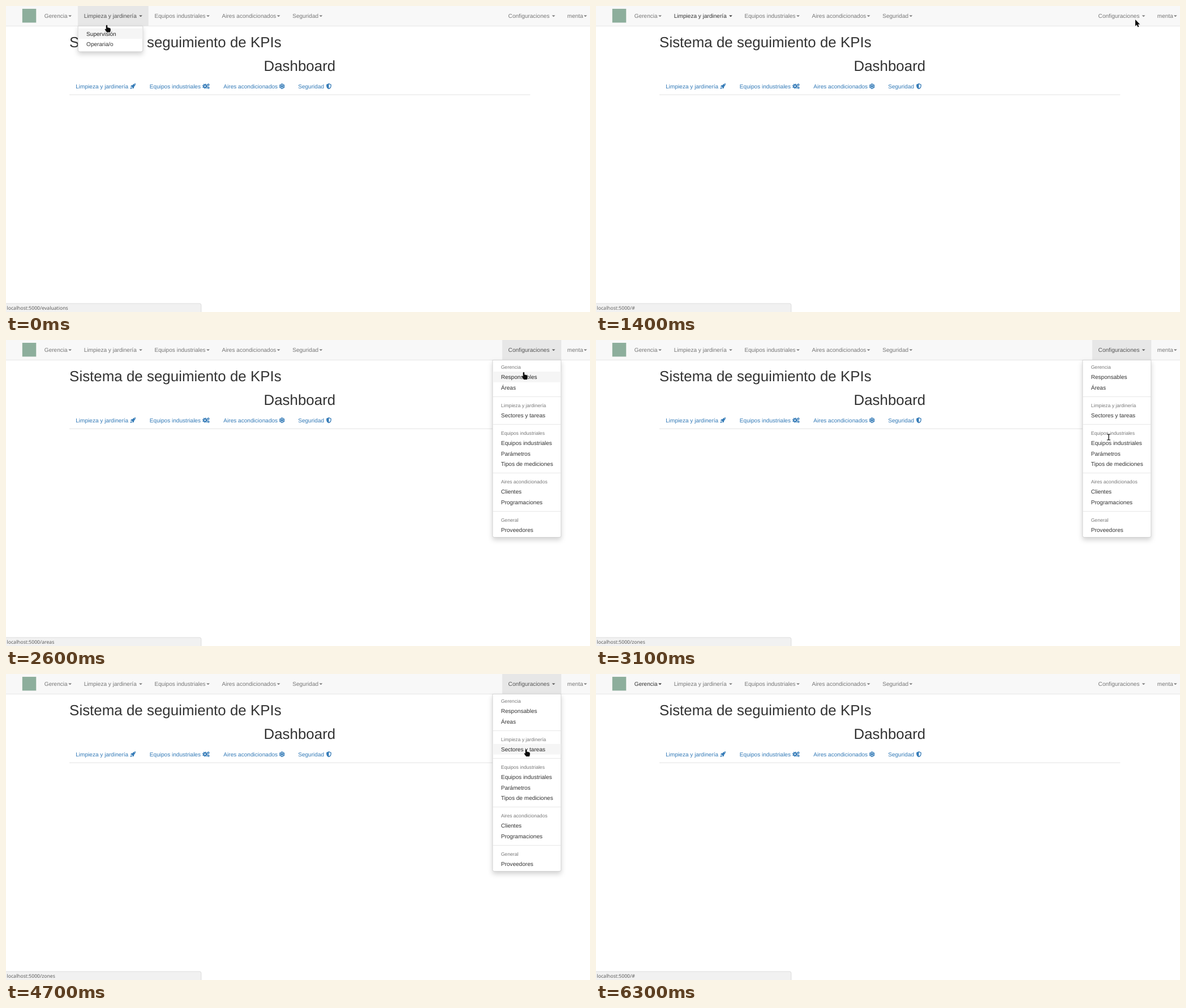
Animation, 1032 px wide and 542 px high, one loop 6700 ms. Source, as an HTML page:

```html
<!DOCTYPE html>
<html lang="es">
<head>
<meta charset="utf-8">
<title>Dashboard</title>
<style>
  html, body { margin: 0; height: 100%; overflow: hidden; background: #fff; }
  svg { display: block; width: 100vw; height: 100vh; }
  text { font: 14px "Liberation Sans", Arial, sans-serif; text-rendering: geometricPrecision; white-space: pre; }
  .nav { color: #777; fill: currentColor; }
  .nav rect { fill: none; }
  .nav.lit { color: #333; }
  .nav.open { color: #555; }
  .nav.open rect { fill: #e7e7e7; }
  .title { font-size: 36px; fill: #333; }
  .tab { fill: #337ab7; color: #337ab7; }
  .menu { filter: drop-shadow(0 6px 6px rgba(0,0,0,.175)); }
  .menu .box { fill: #fff; stroke: #c6c6c6; }
  .row text { fill: #333; }
  .row rect { fill: none; }
  .row.hover rect { fill: #f5f5f5; }
  .row.hover text { fill: #262626; }
  .head { font-size: 12px; fill: #777; }
  #url { font: 12px "Noto Sans", "Open Sans", sans-serif; fill: #5c5c5c; }
  .cursor { fill: #0c0c0c; stroke: #fff; stroke-width: .9; stroke-linejoin: round; paint-order: stroke;
            filter: drop-shadow(.5px .8px .6px rgba(0,0,0,.3)); }
</style>
</head>
<body>
<svg viewBox="0 0 1032 542" preserveAspectRatio="none">
  <g id="page" transform="matrix(.72 0 0 .72 0 -.8)">
    <rect y="-2" width="1434" height="52" fill="#f8f8f8"/>
    <rect y="50" width="1434" height="1" fill="#e0e0e0"/>
    <rect x="40" y="8" width="34" height="34" fill="#8dae9c"/>
    <g id="bar"></g>
    <text class="title" x="155.7" y="102.3">Sistema de seguimiento de KPIs</text>
    <text class="title" x="720.6" y="161" text-anchor="middle">Dashboard</text>
    <rect x="155.5" y="218.8" width="1131" height="1.2" fill="#dcdcdc"/>
    <g id="tabs" class="tab">
      <g transform="translate(304.6 191.5)">
        <path fill-rule="evenodd" d="M13.8.3C10.6.2 8 1.8 5.9 4.4L3 4.6.6 7.9 3.6 7.8 6 10.3 6.1 13.4 9.5 11 9.6 8.1C12.2 6 13.9 3.4 13.8.3ZM11.2 2a.8.8 0 1 1-.01 0Z"/>
        <path d="M2.8 9.4C1.4 10 .8 11.4.5 13.5 2.5 13.3 4 12.6 4.6 11.2Z"/>
      </g>
      <g id="cogs" transform="translate(482.4 191.5)" fill="none" stroke="currentColor"></g>
      <g id="flake" transform="translate(677.4 198.5)" fill="none" stroke="currentColor" stroke-width="1.6" stroke-linecap="round"></g>
      <path transform="translate(785.4 191.5)" fill-rule="evenodd" d="M7 0 13 2.5V6C13 10 10.5 12.8 7 14 3.5 12.8 1 10 1 6V2.5ZM7 2V12C9.6 10.9 11.2 8.8 11.2 6V3.7Z"/>
    </g>
    <g id="menus"></g>
    <g id="status">
      <path id="bubble" d="M-1 756V733H475Q479 733 479 737V756Z" fill="#f1f1f1" stroke="#d2d2d2"/>
      <text id="url" x="2" y="748.6"></text>
    </g>
  </g>
  <g id="hand" class="cursor">
    <path d="M-1.2.9Q-1.2-.3 0-.3T1.2.9V4L5.2 4.9Q6.8 5.4 6.8 7V9.4L5.8 12.6H.2L-3 8.2Q-3.6 7-2.6 6.7T-1.2 7.4Z"/>
  </g>
  <g id="arrow" class="cursor">
    <path d="M0 0V11.6L2.7 9.2 4.5 13.2 6.4 12.4 4.7 8.5H8.2Z"/>
  </g>
  <g id="beam" class="cursor">
    <path d="M-3-5.6H-.8L0-5 .8-5.6H3V-4.4H1.1L.6-4V4L1.1 4.4H3V5.6H.8L0 5-.8 5.6H-3V4.4H-1.1L-.6 4V-4L-1.1-4.4H-3Z"/>
  </g>
</svg>
<script>
const $ = id => document.getElementById(id);

function add(parent, tag, attrs, text) {
  const el = document.createElementNS("http://www.w3.org/2000/svg", tag);
  for (const k in attrs) el.setAttribute(k, attrs[k]);
  if (text) el.textContent = text;
  return parent.appendChild(el);
}

// Navigation bar: label start and caret start
function navItem(label, x, caret) {
  const g = add($("bar"), "g", { class: "nav" });
  add(g, "rect", { x: x - 15, y: -2, width: caret + 38 - x, height: 52 });
  add(g, "text", { x, y: 29.9 }, label);
  add(g, "path", { d: `M${caret} 24h8l-4 4z` });
  return g;
}
const gerencia = navItem("Gerencia", 94.2, 153.1);
const limpieza = navItem("Limpieza y jardinería", 191.3, 326.6);
navItem("Equipos industriales", 364.5, 491.9);
navItem("Aires acondicionados", 529.9, 664.9);
navItem("Seguridad", 703, 768.8);
const config = navItem("Configuraciones", 1232.8, 1339.9);
navItem("menta", 1377.6, 1418);

[["Limpieza y jardinería", 171.1], ["Equipos industriales", 352.5],
 ["Aires acondicionados", 533.8], ["Seguridad", 716.9]]
  .forEach(([label, x]) => add($("tabs"), "text", { x, y: 203.8 }, label));

// Tab icons
function gear(cx, cy, r, w) {
  add($("cogs"), "circle", { cx, cy, r, "stroke-width": w });
  const rim = r + w * .75, tooth = 2 * Math.PI * rim / 16;
  add($("cogs"), "circle", { cx, cy, r: rim, "stroke-width": w * .6, "stroke-dasharray": tooth });
}
gear(6, 7, 3.3, 3);
gear(14.2, 3.3, 1.7, 1.6);
gear(14.2, 10.7, 1.7, 1.6);
for (let a = 0; a < 360; a += 60)
  add($("flake"), "path", { d: "M0 0V-6.2M-2-5.6 0-3.8 2-5.6", transform: `rotate(${a})` });

// Dropdowns: "#" marks a header, "-" a divider
function menu(x, width, lines) {
  const g = add($("menus"), "g", { class: "menu" });
  const box = add(g, "path", { class: "box" });
  const rows = {};
  let y = 56;
  for (const line of lines) {
    if (line === "-") {
      add(g, "rect", { x: x + 1, y: y + 9, width: width - 2, height: 1, fill: "#dedede" });
      y += 19;
    } else if (line[0] === "#") {
      add(g, "text", { class: "head", x: x + 21, y: y + 15.8 }, line.slice(1));
      y += 23;
    } else {
      const row = rows[line] = add(g, "g", { class: "row" });
      add(row, "rect", { x: x + 1, y, width: width - 2, height: 26 });
      add(row, "text", { x: x + 21, y: y + 18.2 }, line);
      y += 26;
    }
  }
  box.setAttribute("d", `M${x + .5} 50.5h${width - 1}V${y + 1.5}q0 4-4 4h${9 - width}q-4 0-4-4z`);
  return { g, rows };
}
const cleaning = menu(176.3, 160, ["Supervisión", "Operaria/o"]);
const settings = menu(1193.8, 169, [
  "#Gerencia", "Responsables", "Áreas", "-",
  "#Limpieza y jardinería", "Sectores y tareas", "-",
  "#Equipos industriales", "Equipos industriales", "Parámetros", "Tipos de mediciones", "-",
  "#Aires acondicionados", "Clientes", "Programaciones", "-",
  "#General", "Proveedores"]);

// Pointer: time, x, y, shape
const path = [
  [0, 178, 34, "hand"], [200, 178, 34, "hand"], [300, 203, 21, "hand"], [600, 203, 21, "hand"],
  [700, 330, 22, "hand"], [800, 640, 30, "arrow"], [900, 1020, 52, "arrow"],
  [1100, 953, 37, "arrow"], [1300, 953, 37, "arrow"], [1400, 953, 24, "arrow"],
  [1500, 919, 34, "hand"], [2100, 919, 34, "hand"], [2700, 914, 62, "hand"],
  [2900, 910, 110, "beam"], [3000, 908, 134, "hand"], [3100, 906, 172, "beam"],
  [3300, 906, 172, "beam"], [3500, 905, 148, "arrow"], [3600, 905, 148, "arrow"],
  [3900, 908, 134, "hand"], [4300, 898, 133, "hand"], [4400, 926, 133, "hand"],
  [4500, 926, 133, "hand"], [4700, 919, 133.5, "hand"], [4900, 868, 133, "hand"],
  [5000, 826, 130, "arrow"], [5100, 793, 128, "arrow"], [5400, 793, 128, "arrow"],
  [5600, 681, 107, "arrow"], [5800, 280, 60, "arrow"], [5900, 150, 24, "hand"], [6000, 90, 14, "hand"]];

// Link preview: time, path, bubble opacity, text opacity
const links = [
  [0, "evaluations", 1, 1], [300, "#", 1, 1], [1400, "#", 1, .95], [1500, "#", .9, .6],
  [1700, "#", 1, 1], [2500, "#", .5, .5], [2600, "areas", 1, 1], [3000, "zones", 1, 1],
  [3400, "zones", .9, .6], [3500, "zones", .8, .3], [3700, "zones", .5, .3],
  [3900, "zones", 1, 1], [5600, "zones", .75, .9], [5700, "zones", .35, .4],
  [5800, "", 0, 0], [6000, "#", .6, .3], [6100, "#", 1, .6], [6300, "#", 1, 1]];

const within = (t, a, b) => t >= a && t < b;
const show = (el, on) => el.style.display = on ? "" : "none";

function render(t) {
  show(cleaning.g, t < 700);
  show(settings.g, within(t, 2100, 5800));
  limpieza.setAttribute("class", t < 700 ? "nav open" : t < 1900 ? "nav lit" : "nav");
  config.setAttribute("class", within(t, 2100, 5800) ? "nav open" : within(t, 1500, 2100) ? "nav lit" : "nav");
  gerencia.classList.toggle("lit", t >= 6000);
  cleaning.rows["Supervisión"].classList.toggle("hover", t < 300);
  settings.rows["Responsables"].classList.toggle("hover", within(t, 2600, 2800));
  settings.rows["Áreas"].classList.toggle("hover", t === 2800);
  settings.rows["Sectores y tareas"].classList.toggle("hover", t === 3000 || within(t, 3800, 5000));

  const [, link, bubble, ink] = links.findLast(k => k[0] <= t);
  $("url").textContent = "localhost:5000/" + link;
  $("bubble").style.opacity = bubble;
  $("url").style.opacity = ink;

  const i = path.findLastIndex(k => k[0] <= t);
  const a = path[i], b = path[i + 1] || a;
  const u = b === a ? 0 : (t - a[0]) / (b[0] - a[0]);
  for (const kind of ["hand", "arrow", "beam"]) show($(kind), t < 6100 && kind === a[3]);
  $(a[3]).setAttribute("transform", `translate(${a[1] + (b[1] - a[1]) * u} ${a[2] + (b[2] - a[2]) * u})`);
}

const start = performance.now();
function tick() {
  render(Math.floor((performance.now() - start) % 6700 / 100) * 100);
  requestAnimationFrame(tick);
}
tick();
</script>
</body>
</html>
```
